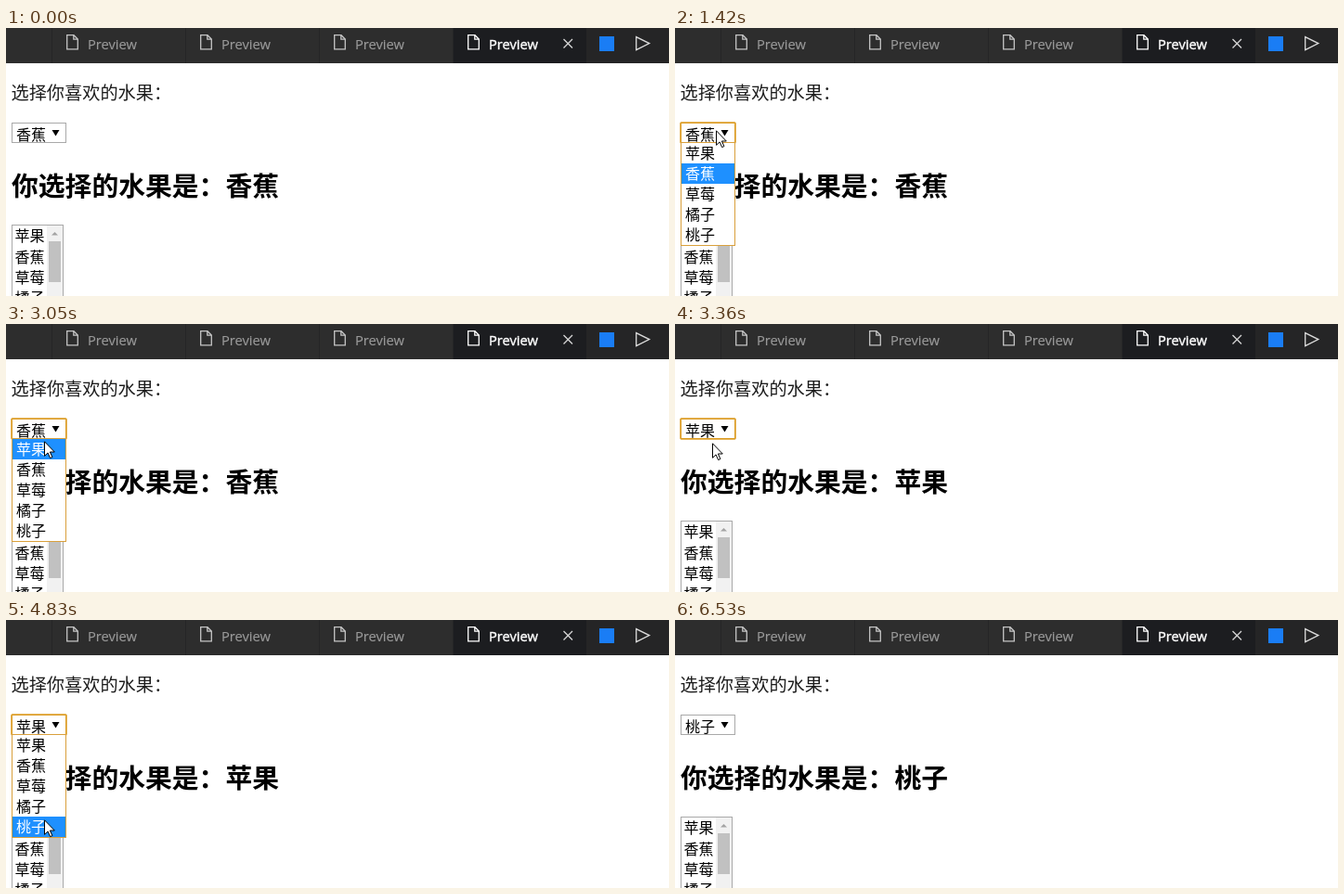
Animation of 714x289 px, one loop 6.6 s. Source, as an HTML page:

```html
<!DOCTYPE html>
<html lang="zh-CN">
<head>
<meta charset="utf-8">
<title>Preview</title>
<style>
@property --row { syntax: '<integer>'; inherits: true; initial-value: 1; }
@property --picked { syntax: '<integer>'; inherits: true; initial-value: 0; }
@property --titled { syntax: '<integer>'; inherits: true; initial-value: 0; }

html, body { margin: 0; height: 100%; overflow: hidden; background: #fff; }
svg { display: block; }
text { font-family: "Noto Sans CJK SC", "Noto Sans CJK", sans-serif; white-space: pre; }
.tabs text { font: 14.7px "Open Sans", "Noto Sans", sans-serif; }
.tabs .idle { fill: #9a9a9a; stroke: #9a9a9a; stroke-width: .15; }
.tabs .active { fill: #fff; stroke: #fff; stroke-width: .4; }
.para { font-size: 19.2px; font-weight: 300; fill: #1c1c1c; }
.head { font-size: 28.8px; font-weight: 700; }
.item { font-size: 16px; }
.icon { fill: none; stroke: currentColor; stroke-width: 1.3; }

#stage, .loop { animation: 6.6s step-end infinite; }
#stage { animation-name: row, picked, titled; }
.label { transform: translateY(calc(var(--picked) * -40px)); }
.title { transform: translateY(calc(var(--titled) * -60px)); }
.mark { transform: translateY(calc(var(--row) * 22px)); }
.unmark { transform: translateY(calc(var(--row) * -22px)); }
.box { animation-name: hover; }
.ring { animation-name: focus; }
.menu { animation-name: menu; }
.mouse { animation-name: mouse; }

@keyframes row {
  0% { --row: 1 } 46.21% { --row: 0 }
  69.69% { --row: 1 } 70.9% { --row: 2 } 71.96% { --row: 3 }
  73.18%, 100% { --row: 4 }
}
@keyframes picked { 0% { --picked: 0 } 49.69% { --picked: 1 } 76.66%, 100% { --picked: 2 } }
@keyframes titled { 0% { --titled: 0 } 50.9% { --titled: 1 } 78.03%, 100% { --titled: 2 } }
@keyframes hover { 0% { stroke: #a9a9a9 } 10.75% { stroke: #808080 } 18.93%, 100% { stroke: #a9a9a9 } }
@keyframes focus { 0% { opacity: 0 } 18.93% { opacity: 1 } 98.93%, 100% { opacity: 0 } }
@keyframes menu {
  0% { opacity: 0 } 21.51% { opacity: 1 }
  26.06% { opacity: 0 } 36.81% { opacity: 1 }
  49.69% { opacity: 0 } 61.36% { opacity: 1 }
  76.66%, 100% { opacity: 0 }
}
@keyframes mouse {
  0% { transform: translate(-50px, -50px) }
  4.84% { transform: translate(244px, 192px) }
  6.06% { transform: translate(200px, 172px) }
  7.27% { transform: translate(150px, 150px) }
  8.33% { transform: translate(104px, 132px) }
  9.54% { transform: translate(74px, 120px) }
  10.75% { transform: translate(56px, 114px) }
  11.96% { transform: translate(48px, 111px) }
  13.18% { transform: translate(44px, 110px) }
  43.93% { transform: translate(44px, 114px) }
  45.15% { transform: translate(43px, 120px) }
  46.21% { transform: translate(41px, 126px) }
  47.42% { transform: translate(40px, 128px) }
  56.66% { transform: translate(43px, 122px) }
  57.87% { transform: translate(49px, 114px) }
  59.09% { transform: translate(51px, 111px) }
  67.42% { transform: translate(51px, 122px) }
  68.63% { transform: translate(50px, 142px) }
  69.69% { transform: translate(48px, 164px) }
  70.9% { transform: translate(45px, 188px) }
  71.96% { transform: translate(42px, 207px) }
  73.18% { transform: translate(41px, 215px) }
  86.21% { transform: translate(48px, 224px) }
  87.42% { transform: translate(72px, 243px) }
  88.48% { transform: translate(137px, 272px) }
  89.69%, 100% { transform: translate(-50px, -50px) }
}
</style>
</head>
<body>
<svg id="stage" width="714" height="289" viewBox="0 0 714 289">
  <defs>
    <path id="page" class="icon" d="M.7.7H8L12.3 5V15.8H.7ZM7.8.7V5.2H12.3"/>
    <g id="options" class="item">
      <text x="11" y="141">苹果</text>
      <text x="11" y="163">香蕉</text>
      <text x="11" y="185">草莓</text>
      <text x="11" y="207">橘子</text>
      <text x="11" y="229">桃子</text>
    </g>
  </defs>

  <g class="tabs">
    <rect width="714" height="38" fill="#252526"/>
    <g fill="#2d2d2d">
      <rect width="49" height="38"/>
      <rect x="50" width="143" height="38"/>
      <rect x="194" width="143" height="38"/>
      <rect x="338" width="143" height="38"/>
    </g>
    <rect x="482" width="143" height="38" fill="#1c1d20"/>
    <g color="#c5c5c5">
      <use href="#page" x="65" y="7"/>
      <use href="#page" x="209" y="7"/>
      <use href="#page" x="353" y="7"/>
    </g>
    <use href="#page" x="497" y="7" color="#fff"/>
    <g class="idle">
      <text x="88" y="22.5">Preview</text>
      <text x="232" y="22.5">Preview</text>
      <text x="376" y="22.5">Preview</text>
    </g>
    <text class="active" x="520" y="22.5">Preview</text>
    <path class="icon" color="#d8d8d8" d="M600.5 12l9.5 9.5M610 12l-9.5 9.5"/>
    <rect x="639" y="9" width="16" height="16" fill="#1a7df5"/>
    <path class="icon" color="#dcdcdc" d="M678.7 9.6V23.6L692.8 16.6Z"/>
  </g>

  <text class="para" x="5.5" y="77">选择你喜欢的水果：</text>

  <text class="head" x="6" y="181">你选择的水果是：</text>
  <svg x="232" y="146" width="80" height="50">
    <g class="title head">
      <text x="4.4" y="35">香蕉</text>
      <text x="4.4" y="95">苹果</text>
      <text x="4.4" y="155">桃子</text>
    </g>
  </svg>

  <rect x="6.5" y="212.5" width="55" height="100" fill="#fff" stroke="#a9a9a9"/>
  <g class="item">
    <text x="9.5" y="230">苹果</text>
    <text x="9.5" y="253">香蕉</text>
    <text x="9.5" y="275">草莓</text>
    <text x="9.5" y="297">橘子</text>
  </g>
  <rect x="44" y="213" width="17" height="76" fill="#f1f1f1"/>
  <rect x="46" y="230" width="13" height="44" fill="#c1c1c1"/>
  <path d="M49 223.5h7l-3.5-3.5Z" fill="#a3a3a3"/>

  <rect class="box loop" x="6.5" y="102.5" width="58" height="21" fill="#fff"/>
  <svg x="8" y="104" width="40" height="19">
    <g class="label item">
      <text x="3" y="17">香蕉</text>
      <text x="3" y="57">苹果</text>
      <text x="3" y="97">桃子</text>
    </g>
  </svg>
  <path d="M49.5 110h8l-4 6.5Z"/>
  <g class="ring loop" fill="none" stroke="#dc9c24">
    <rect x="5.5" y="101.5" width="60" height="23" rx="1.5" stroke-opacity=".75"/>
    <rect x="6.5" y="102.5" width="58" height="21"/>
  </g>

  <g class="menu loop">
    <rect x="6.5" y="123.5" width="58" height="111" fill="#fff" stroke="#d9a03c"/>
    <use href="#options"/>
    <g class="mark">
      <svg x="7" y="124" width="57" height="22" viewBox="7 124 57 22">
        <rect x="7" y="124" width="57" height="22" fill="#1e90ff"/>
        <g class="unmark"><use href="#options" fill="#fff"/></g>
      </svg>
    </g>
  </g>

  <g class="mouse loop">
    <path d="M.5.8V16.3L4.1 12.9 6.6 18.6 8.9 17.6 6.4 12H11.3Z" fill="#fff" stroke="#000"/>
  </g>
</svg>
</body>
</html>
```
